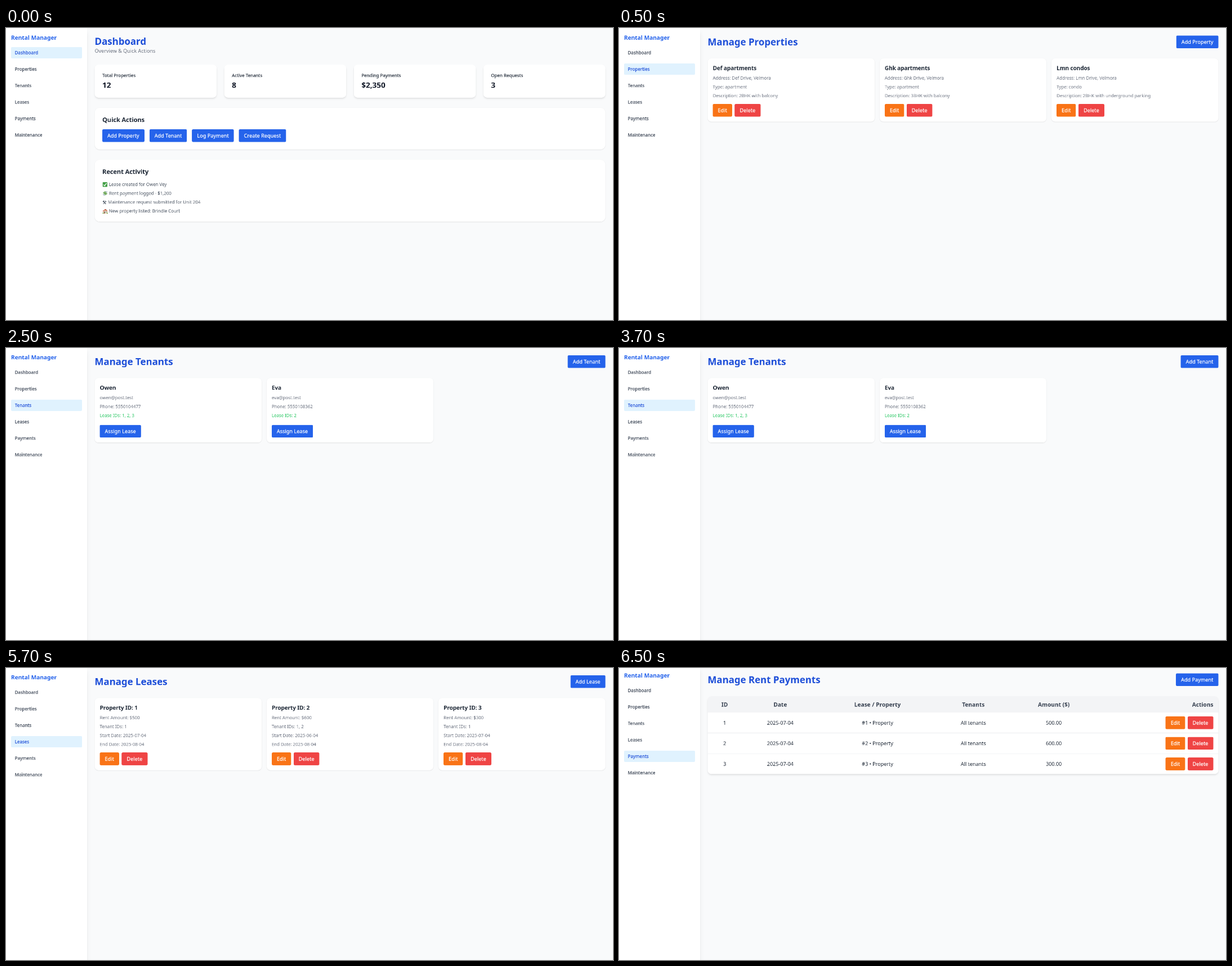
Recreate the animation shown at these times as an HTML page. Size 1078 by 519 pixels, loop 8000 ms.

```html
<!DOCTYPE html>
<html lang="en">
<head>
<meta charset="utf-8">
<title>Rental Manager</title>
<style>
  * { box-sizing: border-box; margin: 0; padding: 0; }
  html, body { width: 100%; height: 100%; overflow: hidden; background: #f9fafb; }
  body { position: relative; }

  /* Laid out 1916px wide, drawn at full size, then scaled to the 1078px stage. */
  #app {
    position: absolute; left: 0; top: 0; width: 1916px; height: 923px; background: #f9fafb;
    transform: scale(.56263); transform-origin: 0 0; will-change: transform;
    font: 16px/24px "Noto Sans", "Open Sans", sans-serif; color: #1f2937;
  }
  .screen {
    position: absolute; inset: 0; overflow: hidden; visibility: hidden;
    animation: 8s step-end infinite;
  }
  .screen > div { position: absolute; left: 0; top: var(--shift); width: 100%; height: 940px; }
  #s0 { animation-name: show0; }
  #s1 { animation-name: show1; }
  #s2 { animation-name: show2; }
  #s3 { animation-name: show3; }
  #s4 { animation-name: show4; }
  @keyframes show0 { 0% { visibility: visible } 6.25%, 100% { visibility: hidden } }
  @keyframes show1 { 0% { visibility: hidden } 6.25% { visibility: visible } 31.25%, 100% { visibility: hidden } }
  @keyframes show2 { 0% { visibility: hidden } 31.25% { visibility: visible } 56.25%, 100% { visibility: hidden } }
  @keyframes show3 { 0% { visibility: hidden } 56.25% { visibility: visible } 81.25%, 100% { visibility: hidden } }
  @keyframes show4 { 0% { visibility: hidden } 81.25%, 100% { visibility: visible } }

  /* Medium and semibold, made from the regular and bold cuts */
  aside a, .btn, .stat { font-weight: 400; letter-spacing: .008em; -webkit-text-stroke: .022em; }
  h2, h3 { font-weight: 700; letter-spacing: -.016em; }

  aside {
    position: absolute; left: 0; top: 0; width: 256px; height: 100%; padding: 16px; background: #fff;
    box-shadow: 0 10px 15px -3px rgba(0,0,0,.1), 0 4px 6px -4px rgba(0,0,0,.1);
  }
  aside b { display: block; font-size: 18px; line-height: 28px; color: #2563eb; }
  aside a {
    display: block; margin-top: 16px; padding: 8px 12px; border-radius: 4px;
    font-size: 14px; line-height: 20px; color: #374151;
  }
  aside a.on { background: #e0f2fe; color: #1d4ed8; }

  main { position: absolute; left: 280px; top: 24px; width: 1612px; }
  h1 { font-size: 30px; line-height: 36px; font-weight: 700; color: #1d4ed8; }
  h2 { font-size: 20px; line-height: 28px; margin-bottom: 16px; }
  h3 { font-size: 18px; line-height: 28px; }
  header { display: flex; justify-content: space-between; align-items: center; height: 40px; margin-bottom: 32px; }
  .sub { color: #6b7280; }

  .btn {
    display: inline-block; height: 40px; padding: 8px 16px; border-radius: 4px;
    background: #2563eb; color: #fff; white-space: nowrap;
  }
  .edit { background: #f97316; }
  .delete { background: #ef4444; }
  .row { display: flex; gap: 8px; }
  .row.wide { gap: 16px; }

  .grid { display: grid; grid-template-columns: repeat(3, 1fr); gap: 16px; }
  .stats { grid-template-columns: repeat(4, 1fr); gap: 24px; margin-top: 32px; }
  .card, .panel { background: #fff; box-shadow: 0 1px 3px rgba(0,0,0,.1), 0 1px 2px -1px rgba(0,0,0,.1); }
  .card { padding: 16px; border-radius: 12px; }
  .card p { margin-top: 8px; font-size: 14px; line-height: 20px; color: #6b7280; }
  .card p.ids { color: #22c55e; }
  .card .row { margin-top: 16px; }
  .card .ids + .row { margin-top: 20px; }
  .panel { margin-top: 32px; padding: 24px; border-radius: 16px; }
  .stat, .table { background: #fff; border-radius: 12px; box-shadow: 0 4px 6px -1px rgba(0,0,0,.1), 0 2px 4px -2px rgba(0,0,0,.1); }
  .stat { height: 104px; padding: 24px; font-size: 14px; line-height: 20px; }
  .stat b {
    display: block; margin-top: 4px; font-size: 24px; line-height: 32px; color: #111827;
    letter-spacing: 0; -webkit-text-stroke: 0;
  }
  .log { display: flex; align-items: center; height: 20px; margin-top: 8px; font-size: 14px; color: #4b5563; }
  .log svg { height: 17px; margin-right: 3.6px; }

  .table { overflow: hidden; }
  .tr { position: relative; height: 65px; border-bottom: 1px solid #e5e7eb; }
  .tr:last-child { height: 64px; border: 0; }
  .tr.th { height: 52px; border: 0; background: #f3f4f6; font-size: 18px; font-weight: 700; color: #374151; }
  .tr > span { position: absolute; top: 50%; transform: translate(-50%, -50%); white-space: nowrap; }
  .tr > .end { position: absolute; right: 16px; top: 12px; line-height: 28px; }
  .end .btn { line-height: 24px; }
</style>
</head>
<body>
<div id="app"></div>
<script>
  const button = (label, kind = '') => `<span class="btn ${kind}">${label}</span>`;
  const row = (items, kind = '') => `<div class="row ${kind}">${items.join('')}</div>`;
  const editDelete = row([button('Edit', 'edit'), button('Delete', 'delete')]);
  const head = (title, action) => `<header><h1>${title}</h1>${button(action)}</header>`;
  const grid = cards => `<div class="grid">${cards.join('')}</div>`;
  const card = (title, lines, actions = editDelete) =>
    `<div class="card"><h3>${title}</h3>${lines.map(t => `<p>${t}</p>`).join('')}${actions}</div>`;

  // Activity icons
  const icon = (width, shapes) => `<svg width="${width}" viewBox="0 0 ${width} 17">${shapes}</svg>`;
  const check = icon(17.4, `<rect x="1" y="1" width="15" height="15" rx="2" fill="#43a047"/>
    <path d="M4 9l3.4 3.6L13.5 4" fill="none" stroke="#fff" stroke-width="2.2"/>`);
  const money = icon(17.4, `<path d="M2 6l8-5 6 9-8 5z" fill="#5f9f4f"/><path d="M4 7l6-4 4 6-6 4z" fill="#a5cf88"/>
    <circle cx="9" cy="8" r="2" fill="#417b38"/><path d="M9 3l5-2 3 3-4 2zM1 10l6 1 2 4-5 1z" fill="#b9c9d1"/>`);
  const tools = icon(14.2, `<g fill="none" stroke="#4b5563"><path d="M4 6l7 8" stroke-width="2.2"/>
    <path d="M11 6l-8 8" stroke-width="1.7"/><path d="M2 7l4-3" stroke-width="3"/>
    <path d="M10 3v3l3 1" stroke-width="1.5"/></g>`);
  const house = icon(17.4, `<path d="M3 7l6-4 6 4v9H3z" fill="#e8d5b5"/><path d="M11 2h2v5h-2z" fill="#8d6e63"/>
    <path d="M1 9l8-7 8 7-1 1-7-5-7 5z" fill="#c54b32"/><path d="M5 10h3v6H5z" fill="#7a5145"/>
    <path d="M10 10h3v3h-3z" fill="#64a9c8"/><path d="M1 13h3v3H1zM14 13h3v3h-3z" fill="#689f38"/>`);

  const stats = [['Total Properties', '12'], ['Active Tenants', '8'], ['Pending Payments', '$2,350'], ['Open Requests', '3']];
  const logs = [
    [check, 'Lease created for Owen Vey'], [money, 'Rent payment logged - $1,200'],
    [tools, 'Maintenance request submitted for Unit 204'], [house, 'New property listed: Brindle Court']
  ];
  const dashboard = `<h1>Dashboard</h1><div class="sub">Overview &amp; Quick Actions</div>
    <div class="grid stats">${stats.map(([k, v]) => `<div class="stat">${k}<b>${v}</b></div>`).join('')}</div>
    <div class="panel"><h2>Quick Actions</h2>
      ${row(['Add Property', 'Add Tenant', 'Log Payment', 'Create Request'].map(t => button(t)), 'wide')}</div>
    <div class="panel"><h2>Recent Activity</h2>
      ${logs.map(([i, t]) => `<div class="log">${i}${t}</div>`).join('')}</div>`;

  const property = (name, kind, about) => card(`${name} ${kind}`,
    [`Address: ${name} Drive, Velmora`, `Type: ${kind.replace(/s$/, '')}`, `Description: ${about}`]);
  const properties = head('Manage Properties', 'Add Property') + grid([
    property('Def', 'apartments', '2BHK with balcony'),
    property('Ghk', 'apartments', '3BHK with balcony'),
    property('Lmn', 'condos', '2BHK with underground parking')
  ]);

  const tenant = (name, mail, phone, ids) => `<div class="card"><h3>${name}</h3><p>${mail}</p>
    <p>Phone: ${phone}</p><p class="ids">Lease IDs: ${ids}</p>${row([button('Assign Lease')])}</div>`;
  const tenants = head('Manage Tenants', 'Add Tenant') + grid([
    tenant('Owen', 'owen@post.test', '5550104477', '1, 2, 3'),
    tenant('Eva', 'eva@post.test', '5550108362', '2')
  ]);

  const lease = (id, rent, who, month) => card(`Property ID: ${id}`,
    [`Rent Amount: $${rent}`, `Tenant IDs: ${who}`, `Start Date: 2025-${month}-04`, 'End Date: 2025-08-04']);
  const leases = head('Manage Leases', 'Add Lease') +
    grid([lease(1, 500, '1', '07'), lease(2, 600, '1, 2', '06'), lease(3, 300, '1', '07')]);

  const columns = [53.5, 229, 536, 838.5, 1092.5];
  const line = (cells, end, kind = '') => `<div class="tr ${kind}">
    ${cells.map((t, i) => `<span style="left:${columns[i]}px">${t}</span>`).join('')}<div class="end">${end}</div></div>`;
  const payments = head('Manage Rent Payments', 'Add Payment') + `<div class="table">
    ${line(['ID', 'Date', 'Lease / Property', 'Tenants', 'Amount ($)'], 'Actions', 'th')}
    ${[500, 600, 300].map((sum, i) => line(
      [i + 1, '2025-07-04', `#${i + 1} • Property`, 'All tenants', sum.toFixed(2)], editDelete)).join('')}</div>`;

  const menu = ['Dashboard', 'Properties', 'Tenants', 'Leases', 'Payments', 'Maintenance'];
  const shifts = [0, 0, -1, -1, -7];
  document.getElementById('app').innerHTML = [dashboard, properties, tenants, leases, payments].map((page, i) =>
    `<section class="screen" id="s${i}" style="--shift:${shifts[i]}px"><div>
      <aside><b>Rental Manager</b>${menu.map((t, j) => `<a class="${i === j ? 'on' : ''}">${t}</a>`).join('')}</aside>
      <main>${page}</main></div></section>`).join('');
</script>
</body>
</html>
```
